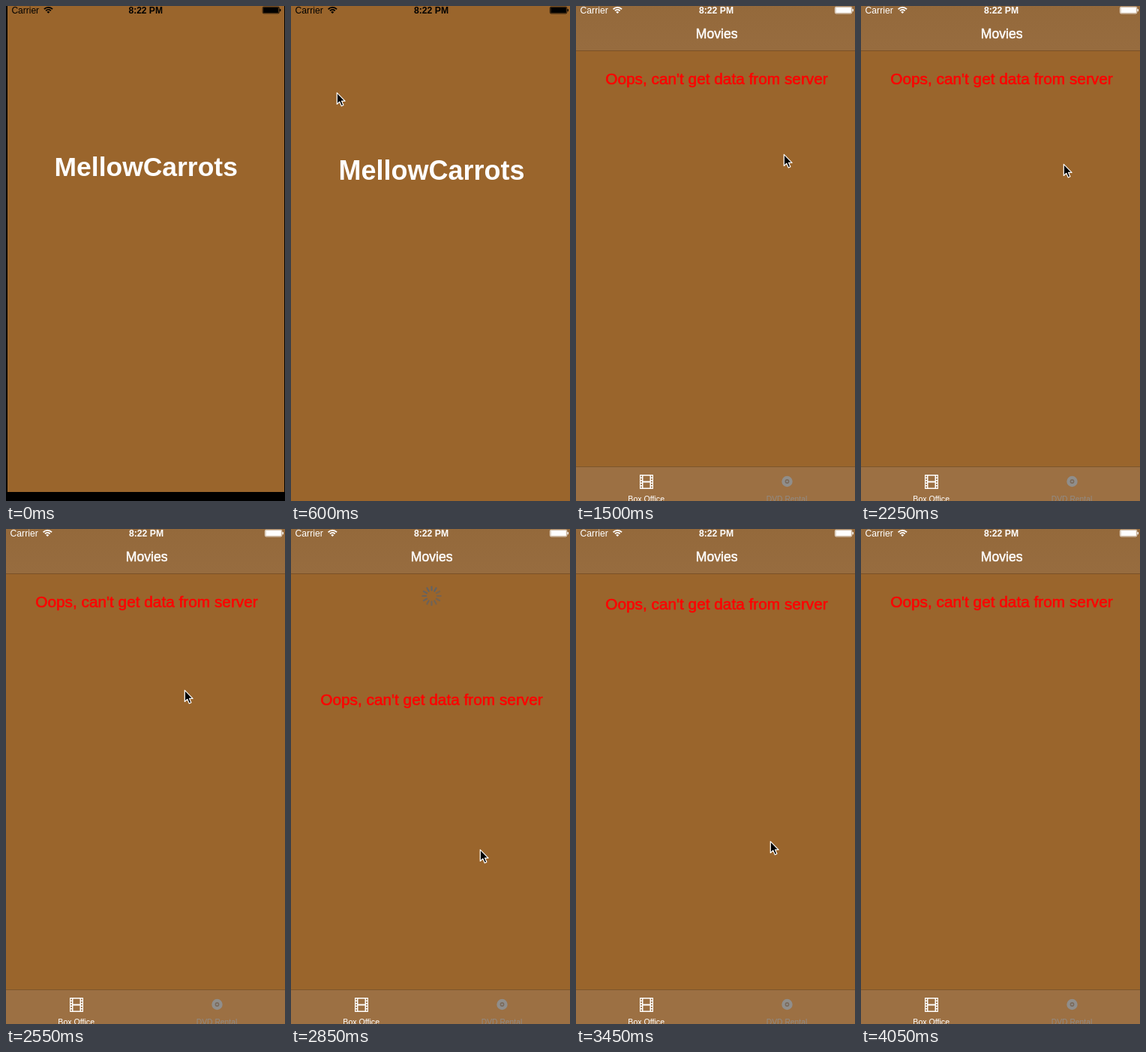
Recreate the animation shown at these times as an HTML page with a canvas. Size 372 by 658 pixels, loop 8 s.

```html
<!DOCTYPE html>
<html lang="en">
<head>
<meta charset="utf-8">
<title>Pull to refresh</title>
<style>
html, body { margin: 0; width: 100%; height: 100%; overflow: hidden; background: #000; }
canvas { display: block; }
</style>
</head>
<body>
<canvas id="stage" width="372" height="658"></canvas>
<script>
const ctx = document.getElementById('stage').getContext('2d');
const W = 372, H = 658, LOOP = 8000, STEP = 150;
const BROWN = '#9a652c';
const FONT = '"Liberation Sans", Arial, sans-serif';

// Keys are [step, x, y]; steps last 150 ms.
const CURSOR = [
  [3, 39, 50], [4, 61, 115], [6, 54, 115], [7, 96, 118], [8, 145, 129],
  [9, 271, 193], [10, 277, 197], [14, 277, 197], [15, 270, 210],
  [16, 245, 214], [17, 238, 214], [18, 245, 336], [19, 252, 426],
  [20, 254, 422], [21, 257, 417], [22, 259, 415], [23, 259, 415],
  [24, 264, 411], [25, 268, 405], [26, 270, 405]
];

function cursorAt(step) {
  const next = CURSOR.findIndex(key => key[0] >= step);
  const b = CURSOR[next];
  if (b[0] === step) return [b[1], b[2]];
  const a = CURSOR[next - 1];
  const k = (step - a[0]) / (b[0] - a[0]);
  return [a[1] + (b[1] - a[1]) * k, a[2] + (b[2] - a[2]) * k];
}

// How far the list is pulled down: drag, then springing back.
function pullAt(step) {
  if (step < 18 || step > 24) return 0;
  if (step === 18) return 61;
  if (step === 19) return 129.5;
  return 78 * Math.pow(0.34, step - 20);
}

function rect(color, x, y, w, h) {
  ctx.fillStyle = color;
  ctx.fillRect(x, y, w, h);
}

function text(str, x, y, size, color, { weight = 400, align = 'center', bolder = 0 } = {}) {
  ctx.font = `${weight} ${size}px ${FONT}`;
  ctx.textAlign = align;
  ctx.fillStyle = color;
  ctx.fillText(str, x, y);
  if (bolder) {
    ctx.strokeStyle = color;
    ctx.lineWidth = bolder;
    ctx.lineJoin = 'round';
    ctx.strokeText(str, x, y);
  }
}

function statusBar(color) {
  text('Carrier', 5.5, 10, 12.2, color, { align: 'left' });
  text('8:22 PM', 187, 10, 12.2, color, { weight: 700 });

  ctx.strokeStyle = color;
  ctx.lineWidth = 1.8;
  for (const r of [4.6, 7.8]) {
    ctx.beginPath();
    ctx.arc(55.3, 9.6, r, -Math.PI * 0.76, -Math.PI * 0.24);
    ctx.stroke();
  }
  ctx.fillStyle = color;
  ctx.beginPath();
  ctx.moveTo(55.3, 10);
  ctx.arc(55.3, 9.6, 2.4, -Math.PI * 0.8, -Math.PI * 0.2);
  ctx.fill();

  ctx.lineWidth = 0.8;
  ctx.beginPath();
  ctx.roundRect(345.4, 1.2, 22.4, 8.8, 1.5);
  ctx.stroke();
  rect(color, 346.3, 2, 20.6, 7.2);
  rect(color, 368.5, 4, 1.4, 3.2);
}

function splash() {
  rect(BROWN, 0, 0, W, H);
  text('MellowCarrots', 187.5, 231, 36, '#fff', { weight: 700 });
  statusBar('#000');
}

function smallSplash() {
  rect('#000', 0, 0, W, H);
  rect(BROWN, 2, 0, 369, 646);
  ctx.save();
  ctx.translate(2, 0);
  ctx.scale(0.985, 0.985);
  text('MellowCarrots', 187.5, 229.4, 36, '#fff', { weight: 700 });
  statusBar('#000');
  ctx.restore();
}

function filmIcon(x, y) {
  rect('#fff', x, y, 18, 19);
  const hole = '#9b6f42';
  rect(hole, x + 4.5, y + 1.5, 9, 7);
  rect(hole, x + 4.5, y + 10.5, 9, 7);
  for (let i = 0; i < 5; i++) {
    rect(hole, x + 1.2, y + 1.5 + i * 3.5, 1.8, 2);
    rect(hole, x + 15, y + 1.5 + i * 3.5, 1.8, 2);
  }
}

function discIcon(x, y) {
  ctx.fillStyle = '#908e8b';
  ctx.beginPath();
  ctx.arc(x, y, 7.2, 0, Math.PI * 2);
  ctx.fill();
  ctx.strokeStyle = '#7b6b5c';
  ctx.lineWidth = 1.6;
  ctx.beginPath();
  ctx.arc(x, y, 2.1, 0, Math.PI * 2);
  ctx.stroke();
}

function spinner(x, y, turn) {
  ctx.save();
  ctx.translate(x, y);
  ctx.lineWidth = 2.2;
  ctx.lineCap = 'round';
  for (let i = 0; i < 12; i++) {
    const shade = ((i - turn) % 12 + 12) % 12 / 11;
    ctx.strokeStyle = `rgba(96, 98, 102, ${0.6 + 0.4 * shade})`;
    ctx.beginPath();
    ctx.moveTo(0, -7.5);
    ctx.lineTo(0, -12.2);
    ctx.stroke();
    ctx.rotate(Math.PI / 6);
  }
  ctx.restore();
}

function movies(step) {
  rect(BROWN, 0, 0, W, H);
  if (step >= 18 && step <= 21) spinner(187.5, 89, (step - 18) * 2);
  text("Oops, can't get data from server", 187.5, 104 + pullAt(step), 20.8, '#f00', { bolder: 0.55 });

  const nav = ctx.createLinearGradient(0, 0, 0, 59);
  nav.addColorStop(0, '#94693b');
  nav.addColorStop(1, '#976c3f');
  rect(nav, 0, 0, W, 59);
  rect('#7a5127', 0, 59, W, 1);
  text('Movies', 187.7, 43, 17.6, '#fff', { bolder: 0.5 });
  statusBar('#fff');

  rect('#9c7043', 0, 612, W, 46);
  rect('#7d562c', 0, 612, W, 1);
  filmIcon(85, 623);
  discIcon(281.5, 632);
  text('Box Office', 93.7, 659, 10.6, '#fff');
  text('DVD Rental', 281, 659, 10.3, '#908b86');
}

function cursor(x, y) {
  const outline = [[0, 0], [0, 15.2], [3.5, 12], [6, 17.6], [8.6, 16.5], [6.2, 11], [10.8, 11]];
  ctx.save();
  ctx.translate(x + 0.3, y + 0.3);
  ctx.beginPath();
  outline.forEach(p => ctx.lineTo(...p));
  ctx.closePath();
  ctx.fillStyle = '#000';
  ctx.fill();
  ctx.strokeStyle = '#fff';
  ctx.lineWidth = 1.2;
  ctx.lineJoin = 'round';
  ctx.stroke();
  ctx.restore();
}

function draw(now) {
  const step = Math.floor((now % LOOP) / STEP);
  if (step === 0) smallSplash();
  else if (step < 5) splash();
  else movies(step);

  if (step === 5) {
    ctx.globalAlpha = 0.3;
    splash();
    ctx.globalAlpha = 1;
  }
  if (step >= 3 && step <= 26) cursor(...cursorAt(step));
}

const start = performance.now();
function frame() {
  draw(performance.now() - start);
  requestAnimationFrame(frame);
}
frame();
</script>
</body>
</html>
```
